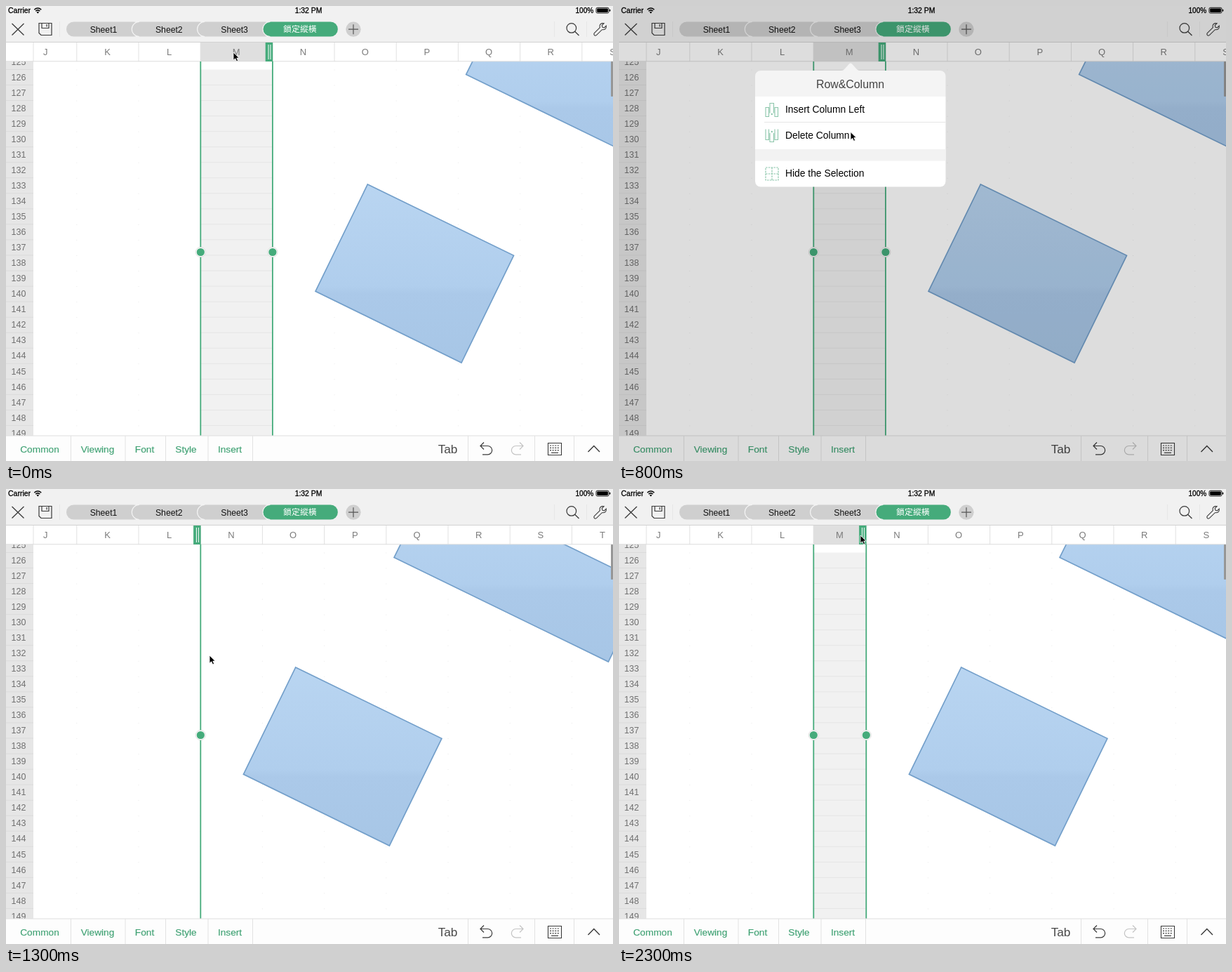
Recreate the animation shown at these times as an HTML page. Size 865 by 648 pixels, loop 2400 ms.

```html
<!DOCTYPE html>
<html lang="en">
<head>
<meta charset="utf-8">
<title>Hide and show a column</title>
<style>
html, body { margin: 0; width: 100%; height: 100%; overflow: hidden; background: #fff; }
svg { display: block; width: 100vw; height: 100vh; }
text { font-family: "Liberation Sans", Arial, Helvetica, "Noto Sans CJK TC", "Noto Sans CJK JP", "Noto Sans CJK", sans-serif; }
</style>
</head>
<body>
<svg id="stage" viewBox="0 0 865 648" xmlns="http://www.w3.org/2000/svg">
  <defs>
    <linearGradient id="blue" x1="0" y1="0" x2="0" y2="1">
      <stop offset="0" stop-color="#b9d5f1"/>
      <stop offset=".57" stop-color="#b0ceed"/>
      <stop offset=".61" stop-color="#abc9e9"/>
      <stop offset="1" stop-color="#a7c6e6"/>
    </linearGradient>
    <clipPath id="all"><rect x="39" y="79" width="826" height="533"/></clipPath>
    <clipPath id="upper"><rect x="39" y="79" width="826" height="295"/></clipPath>
    <clipPath id="lower"><rect x="39" y="374" width="826" height="238"/></clipPath>
    <clipPath id="rows"><rect y="79" width="39" height="533"/></clipPath>
  </defs>
  <g id="sheet"></g>
  <g id="bars"></g>
  <rect id="shade" width="865" height="648"/>
  <g id="popover"></g>
  <g id="menu"></g>
  <path id="cursor" d="M0 0V11.2L2.7 8.8L4.6 12.8L6.6 11.9L4.8 8.1H8.2Z" fill="#000" stroke="#fff" stroke-width=".8"/>
</svg>
<script>
const STEP = 100, STEPS = 24;
const GREEN = '#45ab7b', LEFT = 277, WIDE = 102.6, COL = 88.2, ROW = 22.04, TOP = 90.5;
const $ = id => document.getElementById(id);
const lerp = (a, b, k) => a + (b - a) * k;

const text = (x, y, s, size, fill = '#000', anchor = 'middle', extra = '') =>
  `<text x="${x}" y="${y + size * .36}" font-size="${size}" fill="${fill}" text-anchor="${anchor}" ${extra}>${s}</text>`;
const rect = (x, y, w, h, fill, extra = '') =>
  `<rect x="${x}" y="${y}" width="${w}" height="${h}" fill="${fill}" ${extra}/>`;
const line = (d, color, width = 1, extra = '') =>
  `<path d="${d}" fill="none" stroke="${color}" stroke-width="${width}" ${extra}/>`;
const dot = (x, y, r, fill, extra = '') => `<circle cx="${x}" cy="${y}" r="${r}" fill="${fill}" ${extra}/>`;
const each = (n, f) => Array.from({ length: n }, (_, i) => f(i)).join('');

// Columns J..T, with M having the given width
function columns(w) {
  let x = 12.6;
  return [...'JKLMNOPQRST'].map(name => {
    const c = { name, x, w: name === 'M' ? w : COL };
    x += c.w;
    return c;
  });
}

function shapes(w, fill) {
  const poly = points => `<polygon points="${points}" fill="${fill}" stroke="#739fca" stroke-width="1.7"/>`;
  return `<g transform="translate(${w - WIDE})">` +
    poly('515.3,254 723.5,355.3 649,508 441,406.3') +
    poly('655.6,97.6 961,246 1015,135.6 710,-12.4') + '</g>';
}

function body(w, clip, grid) {
  const style = grid ? '' : 'stroke-dasharray="1 21.04"';
  let s = columns(w).map(c =>
    line(`M${c.x + c.w} ${TOP}V612`, grid ? '#f4f4f4' : '#e9e9e9', 1, style)).join('');
  if (grid) s += each(25, i => line(`M39 ${TOP + i * ROW}H865`, '#f4f4f4'));
  return `<g clip-path="url(#${clip})">${s}${shapes(w, grid ? '#b1d1f2' : 'url(#blue)')}</g>`;
}

function header(w, selected) {
  let s = rect(0, 52, 865, 27, '#fff');
  if (selected) s += rect(LEFT, 52, w, 27, '#dfdfdf');
  for (const c of columns(w)) {
    s += line(`M${c.x + c.w} 52V79`, '#e1e1e1');
    if (c.w > 14) s += text(c.x + c.w / 2 - .4, 65, c.name, 13, '#7b7b7b');
  }
  return s + rect(0, 52, 39, 27, '#fff') + line('M39 52V79', '#e1e1e1') + line('M0 78.8H865', '#dcdcdc');
}

function rowLabels() {
  return rect(0, 79, 39, 533, '#e6e6e6') + '<g clip-path="url(#rows)">' +
    each(25, i => text(18, 79.2 + i * ROW, 125 + i, 12.5, '#707070') +
      line(`M0 ${TOP + i * ROW}H39`, '#dbdbdb')) + '</g>';
}

function selection(w) {
  let s = '';
  if (w > 0) {
    s += rect(LEFT, TOP, w, 612 - TOP, '#f1f1f1') +
      each(24, i => line(`M${LEFT} ${TOP + (i + 1) * ROW}h${w}`, '#e5e5e5'));
  }
  for (const x of w > 0 ? [LEFT, LEFT + w] : [LEFT]) {
    s += line(`M${x + .3} 79V612`, GREEN, 1.8) +
      dot(x + .3, 350.5, 7, '#fff', 'stroke="#d4d4d4" stroke-width=".8"') + dot(x + .3, 350.5, 5.6, GREEN);
  }
  const e = LEFT + w + .6;
  return s + rect(e - 10.5, 52, 10.5, 27, GREEN) + line(`M${e - 6.2} 55V76M${e - 3.2} 55V76`, '#fff', 1);
}

function sheet(w, torn) {
  const cells = torn ? body(WIDE, 'upper', true) + body(0, 'lower', true) : body(w, 'all', false);
  return rect(0, 52, 865, 560, '#fff') + cells + rowLabels() +
    header(torn ? WIDE : w, !torn && w > 0) + selection(w) +
    rect(862, 79, 3, 50, '#979797', 'rx="1"');
}

function bars() {
  const ink = '#3a3a3a';
  const bold = 'stroke="#000" stroke-width=".3"';
  const status = text(3, 6.7, 'Carrier', 10.5, '#000', 'start', bold) +
    text(431, 6.7, '1:32 PM', 10.4, '#000', 'middle', bold) +
    text(811.5, 6.7, '100%', 10.1, '#000', 'start', bold) +
    line('M40.3 5.2Q45.3 .8 50.3 5.2M42.2 7.2Q45.3 4.6 48.4 7.2', '#000', 1.5) +
    '<path d="M43.4 8.6Q45.3 7.2 47.2 8.6L45.3 10.8Z"/>' +
    rect(841, 2.3, 18, 7.8, 'none', 'rx="1.8" stroke="#000" stroke-width=".9"') +
    rect(842.2, 3.5, 15.6, 5.4, '#000', 'rx=".8"') + rect(859.8, 4.7, 1.5, 3, '#000', 'rx=".7"');

  const tabs = ['Sheet1', 'Sheet2', 'Sheet3', '鎖定縱橫'].map((name, i) => {
    const x = 86 + i * 93.3, on = i === 3;
    return rect(x, 22.5, 107, 21, on ? GREEN : '#cfcfcf', 'rx="10.5"') +
      (i ? line(`M${x + 10.5} 22.5a10.5 10.5 0 0 0 0 21`, '#f6f6f6', 1.1) : '') +
      text(x + 53, 33.2, name, on ? 11.9 : 12.2, on ? '#fff' : '#111');
  }).join('');

  const tools = line('M8.5 25L25.5 41.5M25.5 25L8.5 41.5', ink, 1.3) +
    line('M47 24.5H65V41.5H50L47 38.5ZM51 24.5V31.5H61V24.5M58 26V29.5', ink, 1.2) +
    line('M76.5 22V44M781.5 22V44M827.5 22V44', '#e7e7e7') +
    dot(495, 33.2, 10.6, '#cfcfcf') + line('M488 33.2H502M495 26.2V40.2', '#555', 1.2) +
    dot(805.8, 31.4, 6.8, 'none', `stroke="${ink}" stroke-width="1.2"`) + line('M810.6 36.2L816.5 42', ink, 1.3) +
    line('M838.3 38.6L846.4 30.6Q845 25.7 849.4 24.6L852 24.7L849.2 27.6L850 30.3L852.6 31L855.3 28.3Q856 34.4 849.4 33.7L841.3 41.6Q839.6 42.7 838.3 41.4Q837.2 40 838.3 38.6Z', ink, 1.1);

  const labels = [['Common', 48], ['Viewing', 130.5], ['Font', 197.5], ['Style', 256.5], ['Insert', 319]]
    .map(([s, x]) => text(x, 631, s, 13.7, '#3fa173', 'middle', 'stroke="#3fa173" stroke-width=".15"')).join('');
  const splits = [92.5, 170, 227.5, 288, 351.5, 658.5, 753.5, 809.5]
    .map(x => line(`M${x} 612V648`, '#e2e2e2')).join('');
  const keys = each(3, i => line(`M775 ${626 + i * 3.3}H789`, ink, 1.2, 'stroke-dasharray="2 1.6"'));

  return rect(0, 0, 865, 52, '#f1f1f1') + line('M0 51.5H865', '#d2d2d2') + status + tabs + tools +
    rect(0, 612, 865, 36, '#fdfdfd') + line('M0 612H865', '#dedede') + labels + splits +
    text(629.5, 631, 'Tab', 17.2, '#484848') +
    line('M681 621.5L676 626.5L681 631.5M676 626.5H686.5A6 6 0 0 1 686.5 638.8H679', ink, 1.2) +
    line('M732 621.5L737 626.5L732 631.5M737 626.5H726.5A6 6 0 0 0 726.5 638.8H734', '#c4c4c4', 1.2) +
    line('M772.5 622.5H791.5V639.5H772.5Z', ink, 1.1) + keys + line('M777 636.3H787', ink, 1.2) +
    line('M829.5 635L837.8 626.5L846 635', ink, 1.4);
}

function popover() {
  const mint = '#8cc6ab';
  return '<path d="M194 129V100a8 8 0 0 1 8-8H317Q320 92 323 88L328 82.5Q330 80.5 332 82.5L337 88Q340 92 343 92H457.5a8 8 0 0 1 8 8V129Z" fill="#f4f4f4"/>' +
    '<path d="M194 129H465.5V249.5a8 8 0 0 1-8 8H202a8 8 0 0 1-8-8Z" fill="#fff"/>' +
    rect(194, 204, 271.5, 16.5, '#f2f2f2') + line('M207 165.5H465.5', '#e6e6e6') +
    text(329.5, 111, 'Row&amp;Column', 15.9, '#444') +
    [['Insert Column Left', 147], ['Delete Column', 184], ['Hide the Selection', 238.5]]
      .map(([s, y]) => text(237, y, s, 13.85, '#000', 'start')).join('') +
    line('M213.5 157.5H209V144.5H213.5ZM222 157.5H226.5V144.5H222ZM215 152.5V138.5H220.5V152.5M213.5 157.5V148M222 157.5V148', mint, 1.1) +
    dot(217.8, 154, 1.2, mint) +
    line('M209 175.5V190.5H213.5V175.5M222 175.5V190.5H226.5V175.5M215 181V193.5H220.5V181', mint, 1.1) +
    dot(217.8, 179, 1.2, mint) +
    line('M209 230H227V248H209ZM209 239H227M218 230V248', mint, 1.2, 'stroke-dasharray="2.6 1.2"');
}

function menu(pressed) {
  const items = [['Copy', 188.3], ['Clear Contents', 273], ['Row&amp;Column...', 385.8], ['Cut', 466.5]];
  return '<path d="M316 109.5L324 101L332 109.5Z" fill="#2c2c2c"/>' +
    '<path d="M328 109H164.500a6 6 0 0 0-6 6V133a6 6 0 0 0 6 6H328ZM442 109H485a6 6 0 0 1 6 6V133a6 6 0 0 1-6 6H442Z" fill="#2c2c2c"/>' +
    rect(327.5, 109, 115, 30, pressed ? '#acacac' : '#2c2c2c') +
    line('M216.5 109V139M327.5 109V139M442.5 109V139', '#d8d8d8') +
    items.map(([s, x]) => text(x, 123.7, s, 12.25, '#fff')).join('');
}

// Cursor stops: step, x, y
const path = [[0, 324, 66], [1, 324, 66], [4, 370, 122], [6, 370, 122], [10, 290, 237], [13, 290, 237],
  [16, 263, 67], [18, 263, 67], [23, 344, 66]];

function cursorAt(n) {
  const i = path.findIndex(p => p[0] >= n);
  const b = path[i], a = path[Math.max(0, i - 1)];
  let k = b[0] > a[0] ? (n - a[0]) / (b[0] - a[0]) : 0;
  if (n < 18) k = k * k * (3 - 2 * k);
  return [lerp(a[1], b[1], k), lerp(a[2], b[2], k)];
}

const widthAt = n => n < 12 ? WIDE : Math.max(0, n - 18) * 15;

function draw(n) {
  const fading = n === 12, open = n >= 5 && n < 12;
  $('sheet').innerHTML = sheet(widthAt(n), fading);
  $('shade').setAttribute('opacity', open ? .135 : fading ? .05 : 0);
  $('popover').setAttribute('opacity', open ? 1 : fading ? .35 : 0);
  $('menu').innerHTML = n >= 2 && n <= 5 ? menu(n === 5) : '';
  $('cursor').setAttribute('transform', `translate(${cursorAt(n)})`);
}

$('bars').innerHTML = bars();
$('popover').innerHTML = popover();

const start = performance.now();
let shown = -1;
function tick() {
  const n = Math.floor((performance.now() - start) / STEP) % STEPS;
  if (n !== shown) draw(shown = n);
  requestAnimationFrame(tick);
}
tick();
</script>
</body>
</html>
```
